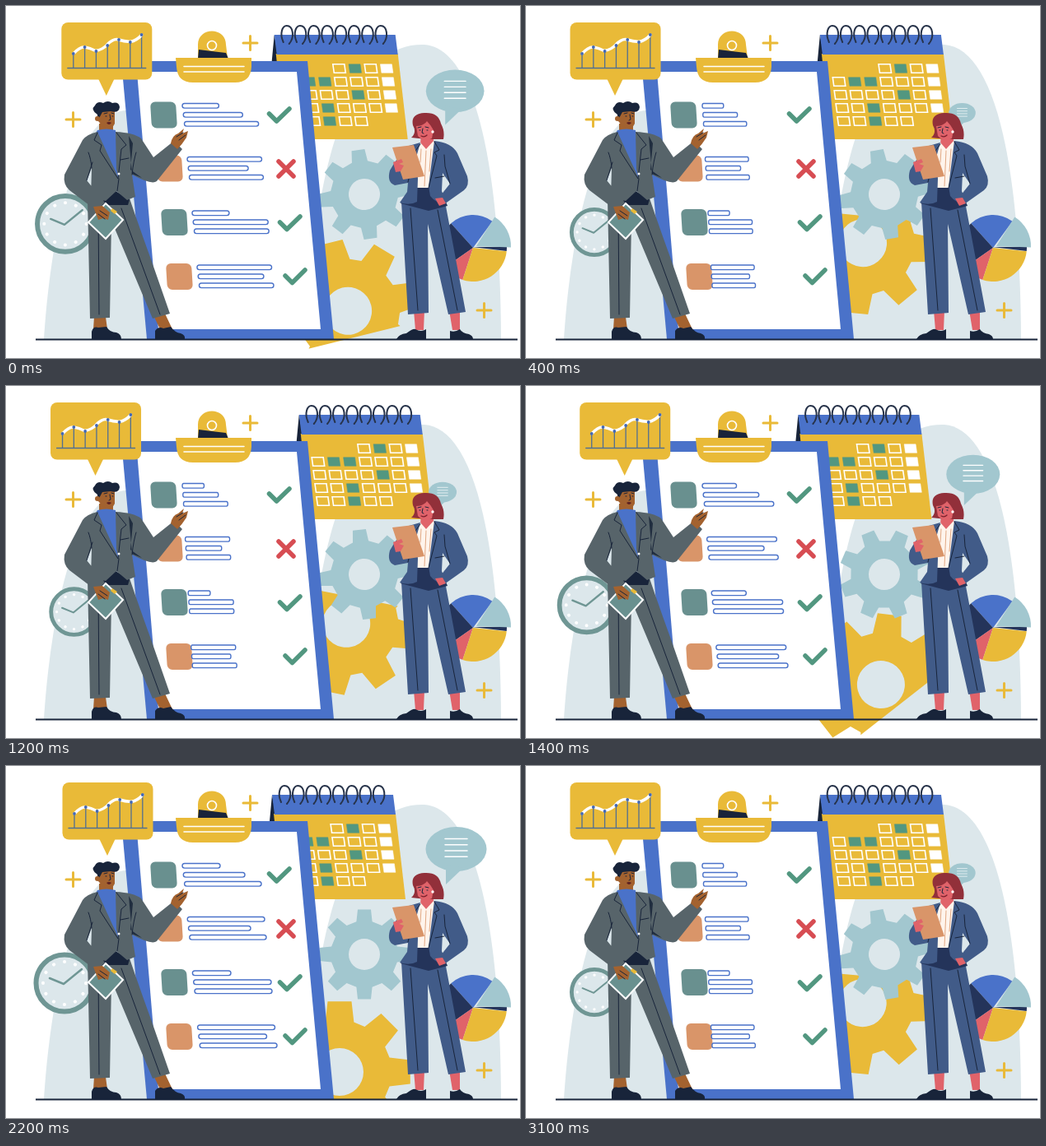
An HTML page for the animation above (3500 ms loop, 624 by 428 pixels).

```html
<!DOCTYPE html>
<html lang="en">
<head>
<meta charset="utf-8">
<title>Planning team</title>
<style>
html, body { margin: 0; width: 100%; height: 100%; overflow: hidden; background: #fff; }
svg { display: block; width: 100vw; height: 100vh; }
.line { fill: none; stroke-linecap: round; stroke-linejoin: round; }
.yellow { fill: #e9ba38; } .blue { fill: #4a72c9; } .pale { fill: #dce7eb; }
.teal { fill: #a2c7cf; } .navy { fill: #18243a; } .slate { fill: #69908f; }
.grey { fill: #57646a; } .suit { fill: #415b88; } .deep { fill: #24345a; }
.brown { fill: #a3622f; } .pink { fill: #e0636a; } .hair { fill: #92303a; }
.orange { fill: #d99569; } .white { fill: #fff; }
.ink { stroke: #18243a; stroke-width: 1; }
#bars rect { fill: #fff; stroke: #4a72c9; stroke-width: 1.4; vector-effect: non-scaling-stroke; }
</style>
</head>
<body>
<svg viewBox="0 0 624 428" xmlns="http://www.w3.org/2000/svg">
  <clipPath id="cut"><rect x="-100" y="-100" width="200" height="175"/></clipPath>

  <g class="pale">
    <path d="M46 405C52 310 76 130 146 127L220 405Z"/>
    <path d="M366 405C370 250 400 47 505 47C566 47 600 180 601 405Z"/>
  </g>
  <g id="pie"></g>
  <path class="line" stroke="#e9ba38" stroke-width="3" d="M288 45h17m-8.500-8.500v17M73 138h17m-8.500-8.500v17M572 370h17m-8.500-8.500v17"/>

  <g id="clock">
    <circle r="34.500" fill="#dce7eb" stroke="#6f9694" stroke-width="6"/>
    <circle r="26" fill="none" stroke="#fff" stroke-width="4" stroke-linecap="round" pathLength="120" stroke-dasharray="0.100 9.900"/>
    <path class="line" d="M-18 -6L-1 1L21 -17" stroke="#6f9694" stroke-width="2.500"/>
  </g>

  <g id="calendar">
    <path class="navy" d="M323 35L320 67H329Z"/>
    <path class="yellow" d="M325 58H473L485 162H336Z"/>
    <path class="blue" d="M323 35H470L473 59H326Z"/>
    <g id="cells"></g>
    <g id="rings" class="line" stroke="#27334a" stroke-width="2"></g>
  </g>

  <!-- The big gear turns about a point above its hub, carrying its flat cut edge along. -->
  <g id="bigGear"><g clip-path="url(#cut)"><path id="bigTeeth" class="yellow" fill-rule="evenodd" transform="translate(0 42)"/></g></g>
  <g id="smallGear"><path id="smallTeeth" class="teal" fill-rule="evenodd"/></g>

  <path class="blue" d="M140 67H366L398 405H171Z"/>
  <path class="white" d="M159 80H353L382 393H185Z"/>
  <path class="yellow" d="M233 63V47C233 25 267 25 267 47L269 63Z"/>
  <path class="navy" d="M234 53L267 57L270 64H233Z"/>
  <circle cx="250" cy="48" r="5.500" fill="none" stroke="#fff" stroke-width="1.600"/>
  <path class="yellow" d="M206 63H298V74Q297 93 278 93H227Q208 93 207 74Z"/>
  <path class="line" d="M216 73.500H289M216 80H289" stroke="#fff" stroke-width="1.500"/>

  <g id="tiles"></g>
  <g id="bars"></g>
  <g class="line" stroke="#529780" stroke-width="5.500">
    <path d="M319.500 131L328.500 140L344 125M332.500 263L341 271.500L357 256M339 328L347.500 336.500L363 321"/>
    <path d="M331 189L349 207M349 189L331 207" stroke="#d74d53"/>
  </g>

  <g id="chart">
    <rect class="yellow" x="68.500" y="20" width="110" height="69.500" rx="8"/>
    <path class="yellow" d="M113 88H133L123 109Z"/>
    <path id="stems" class="line" stroke="#526f91" stroke-width="1.300"/>
    <path class="line" d="M83 58Q91 49 97 50T110 54.500Q119 53 124 47Q132 39 138 41T152 43.500Q160 42 166 35" stroke="#fff" stroke-width="3.500"/>
    <g id="dots" fill="#4267b3"></g>
  </g>

  <g id="talk">
    <ellipse class="teal" cx="546.500" cy="101" rx="37" ry="27"/>
    <path class="teal" d="M534 120L534 144L555 124Z"/>
    <path class="line" d="M533 88.500H560M533 95.800H560M533 103H560M533 110.300H560" stroke="#fff" stroke-width="1.500"/>
  </g>

  <g id="man">
    <path class="brown" d="M107 378H121L123 393H106ZM179 376L193 374L202 393H187Z"/>
    <path class="navy" d="M104 405V396Q106 389 112 391L122 390Q126 397 134 397Q140 399 140 405ZM181 405V395Q185 389 191 392L200 390Q205 397 212 398Q218 400 217 405Z"/>
    <path class="grey" d="M99 234H150Q164 275 176 308L199 374L178 380L128 261L126 379L102 380Z"/>
    <path class="line ink" d="M112 248L113 375M140 246L187 375"/>
    <path class="navy" d="M98 234L128 222L150 235L148 242H101Z"/>
    <path class="brown" d="M113 143H130V157H113Z"/>
    <path class="blue" d="M111 151Q122 148 133 151L138 211H134L108 156Z"/>
    <path class="grey" d="M111 153Q98 156 93 163L71 205Q69 217 77 224L110 249L120 239L98 212L104 197L103 233L121 237L134 225L147 236L157 232L153 205Q177 218 183 213L214 174L204 164L179 184L164 161Q155 154 133 153L134 198L137 210Z"/>
    <path fill="#202d3f" d="M149 158L154 167L151 199L165 209L153 204Z"/>
    <path class="line ink" d="M111 154L107 163L116 169L114 176L136 210L140 174L146 169L134 154M137 210L135 225M98 212L105 190M139 187l10-2M104 197Q103 185 100 178M153 205Q155 187 158 178"/>
    <circle cx="137" cy="204" r="1.500" class="white"/>
    <path class="brown" d="M200 167Q202 157 209 155L216 149L214 155L221 152L219 160Q214 168 208 174Z"/>
    <path class="line ink" d="M207 159L215 154M210 163L218 157" stroke-width=".7"/>
    <path class="slate" d="M121 240L142 260L121 283L100 263Z" stroke="#fff" stroke-width="2"/>
    <path d="M129 246l6 4l-3 3l-5-4Z" class="yellow"/>
    <path class="brown" d="M106 244L117 243L126 251L124 260L118 258L112 260Z"/>
    <path class="line ink" d="M114 249l9 6M112 253l8 6" stroke-width=".7"/>
    <path class="brown" d="M112 125Q122 121 132 125L132 143Q128 152 118 147L112 140Z"/>
    <path class="navy" d="M111 140V132Q102 126 108 121Q111 115 118 118Q124 114 129 118Q137 116 138 123Q137 131 127 128L117 129Z"/>
    <path class="line ink" d="M119 131l4-1M128 130l3 1M126 132l1 6l-2 1M121 134h1M129 134h1"/>
    <path d="M122 142q3-2 6 0q-3 4-6 0Z" fill="#5b1f22"/>
    <circle cx="111" cy="137" r="3" class="brown"/>
  </g>

  <g id="woman">
    <path class="pink" d="M495 370H508L507 394H497ZM538 370H551V394H542Z"/>
    <path class="navy" d="M474 405Q477 399 486 398Q494 392 497 393Q504 397 510 393V405ZM539 405V395Q545 397 551 393Q554 398 562 399Q567 401 567 405Z"/>
    <path class="suit" d="M480 238H533L558 372L537 375L512 265L513 373L488 375Z"/>
    <path class="line ink" d="M491 246L500 370M524 248L548 370"/>
    <path class="deep" d="M497 219H526L536 243L513 249L479 240Z"/>
    <path class="pink" d="M504 154H518L520 171L510 180L503 169Z"/>
    <path fill="#fff4ec" d="M503 166L510 174L519 164L525 180L516 221H499L497 180Z"/>
    <path class="line" d="M510 176L508 219M516 174L514 201M504 174L503 190" stroke="#d99569" stroke-width=".8"/>
    <path class="suit" d="M503 166L489 170Q480 176 466 200Q462 214 472 218L488 215L487 226L478 239Q490 243 499 238L500 210L498 184Z"/>
    <path class="suit" d="M520 164Q541 166 548 179L560 207Q563 218 556 224L532 241L524 235L539 216L530 203L529 225L534 239Q524 242 515 231L513 219Z"/>
    <path class="line ink" d="M520 165L526 175L520 178L523 182L513 221M503 168L497 176L500 200M539 216L533 195L532 181M521 209l11-2M488 214L491 202"/>
    <path class="pink" d="M521 234L530 233L534 240L526 243Z"/>
    <path class="orange" d="M469 172L495 169L508 207L482 211Z"/>
    <path class="pink" d="M470 190L480 186L482 190L477 192L483 194L479 201L473 202Z"/>
    <path class="hair" d="M492 160Q499 154 494 145Q491 131 508 130Q525 129 528 143Q533 152 531 162L510 162Z"/>
    <path class="pink" d="M498 146Q507 146 511 140Q516 145 519 151L517 161Q507 166 500 158Z"/>
    <path class="line ink" d="M500 148l4-1M509 147l4 1M506 149l-1 5l2 1M502 151h1M511 151h1" stroke-width=".8"/>
    <path class="line" d="M504 158q4 2 7-1" stroke="#7d202d" stroke-width="1.300"/>
    <circle cx="518" cy="153" r="1.700" class="white"/>
  </g>
  <path d="M36 405.500H621" stroke="#18243a" stroke-width="2"/>
</svg>

<script>
const byId = id => document.getElementById(id);

function add(parent, tag, attributes) {
  const node = document.createElementNS('http://www.w3.org/2000/svg', tag);
  for (const name in attributes) node.setAttribute(name, attributes[name]);
  byId(parent).append(node);
}

function polar(radius, degrees) {
  const a = degrees * Math.PI / 180;
  return [radius * Math.cos(a), radius * Math.sin(a)];
}

// Eight straight-sided teeth around a disc with a round hole.
function gearPath(outer, root, hole, halfTooth) {
  const points = [];
  const corner = (radius, half, centre) =>
    points.push(polar(radius, centre + Math.asin(half / radius) * 180 / Math.PI));
  for (let angle = 0; angle < 360; angle += 45) {
    corner(root, -halfTooth * 1.2, angle);
    corner(outer, -halfTooth, angle);
    corner(outer, halfTooth, angle);
    corner(root, halfTooth * 1.2, angle);
  }
  return `M${points.join('L')}ZM${hole} 0A${hole} ${hole} 0 1 0 ${-hole} 0A${hole} ${hole} 0 1 0 ${hole} 0Z`;
}
byId('bigTeeth').setAttribute('d', gearPath(87, 63, 29, 14.5));
byId('smallTeeth').setAttribute('d', gearPath(55, 41, 19, 8));

function slice(x, y, radius, from, to, kind) {
  const start = polar(radius, from), end = polar(radius, to);
  add('pie', 'path', {
    class: kind,
    d: `M${x} ${y}L${x + start[0]} ${y + start[1]}A${radius} ${radius} 0 0 1 ${x + end[0]} ${y + end[1]}Z`
  });
}
slice(567, 294, 40, 228, 306, 'blue');
slice(567, 294, 40, 145, 228, 'deep');
slice(567, 294, 41, 108, 145, 'pink');
slice(567, 294, 41, 6, 108, 'yellow');
slice(567, 293, 41, 0, 7, 'deep');
slice(571, 292, 42, 302, 362, 'teal');

// w outlined, g green, s solid white
['---wgws', 'wggwwws', 'wwwwgws', 'wwgwwws', 'wwgww--'].forEach((row, r) =>
  [...row].forEach((kind, c) => {
    if (kind === '-') return;
    const x = 336.5 + r * 1.9 + c * 19.2, y = 70.8 + r * 16;
    add('cells', 'path', {
      d: `M${x} ${y}h14l1.5 10.500h-14Z`,
      fill: { w: 'none', g: '#529780', s: '#fff' }[kind],
      stroke: kind === 'g' ? '#529780' : '#fff',
      'stroke-width': kind === 'w' ? 1.6 : .5
    });
  }));

for (let i = 0; i < 8; i++)
  add('rings', 'path', {
    d: 'M334 44C329 33 333 24 338 24C346 24 348 38 341 46',
    transform: `translate(${i * 16.3} 0)`
  });

// Each row: tile x, y, then the right ends of its three bars.
[[175, 116.5, 260, 290, 310], [182, 181.5, 314, 297, 316],
 [188, 247, 273, 322, 323], [194, 313, 326.5, 316.5, 329]].forEach(([x, y, ...ends], row) => {
  add('tiles', 'rect', {
    class: row % 2 ? 'orange' : 'slate', x: 0, y: 0, width: 31, height: 32, rx: 6,
    transform: `translate(${x} ${y}) skewX(3.5)`
  });
  ends.forEach((end, i) => {
    const left = 214 + row * 6.2 + i * 1.3;
    add('bars', 'rect', { x: left, y: y + 2 + i * 11, width: end - left, height: 5.6, rx: 2.8 });
  });
});

const heights = [58, 50, 55, 48, 41, 44, 35];
const stemX = i => 83 + i * 13.8;
heights.forEach((y, i) => add('dots', 'circle', { cx: stemX(i), cy: y, r: 1.9 }));
byId('stems').setAttribute('d', 'M76 75.500H171' + heights.map((y, i) => `M${stemX(i)} ${y}V75`).join(''));

function ease(p) {
  if (p <= 0) return 0;
  if (p >= 1) return 1;
  return p < .5 ? 2 ** (20 * p - 10) / 2 : 1 - 2 ** (10 - 20 * p) / 2;
}

// 0 is spread out, 1 is drawn together.
const gathered = t => ease((t + 294) / 800) - ease((t - 952) / 800) + ease((t - 2242) / 800);

const move = (id, value) => byId(id).setAttribute('transform', value);

function draw(now) {
  const t = Math.min(3100, Math.floor(now % 3500 / 100) * 100);
  const u = gathered(t), mix = (a, b) => a + (b - a) * u;
  move('calendar', `translate(${34 * u} 0)`);
  move('chart', `translate(${-15 * u} 0)`);
  move('clock', `translate(${mix(71, 83)} ${mix(264, 275)}) scale(${mix(1, .8)})`);
  move('bars', `translate(214 0) scale(${mix(1, .56)} 1) translate(-214 0)`);
  move('talk', `translate(516 153) scale(${mix(1, .44)}) translate(-516 -153)`);
  move('bigGear', `translate(405 330) rotate(${-175 * u})`);
  move('smallGear', `translate(435 229) rotate(${-100 * u})`);
  requestAnimationFrame(draw);
}
draw(0);
</script>
</body>
</html>
```
